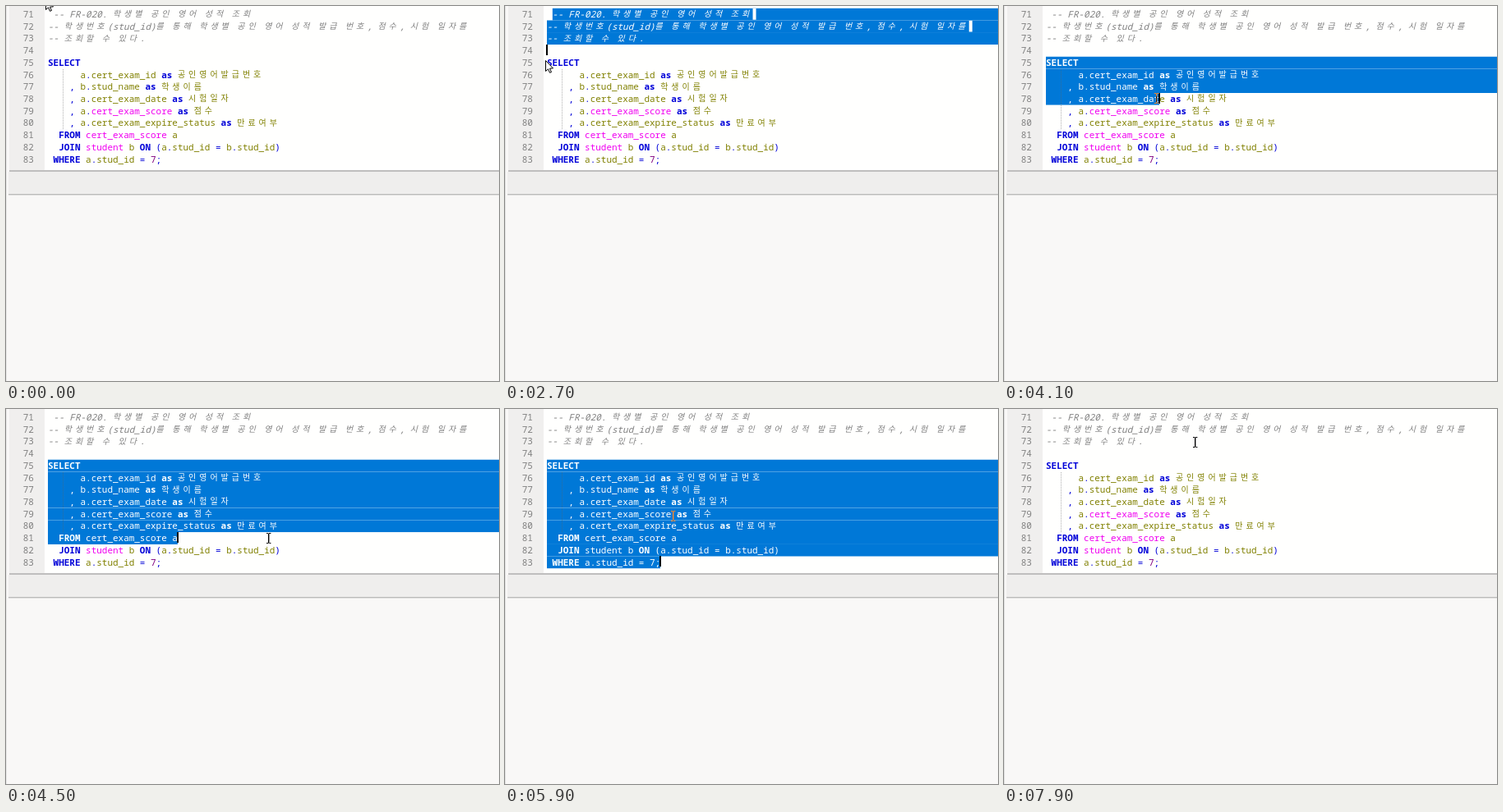
An HTML page with a canvas for the animation above (8 s loop, 600 by 457 pixels).

```html
<!DOCTYPE html>
<html lang="ko">
<head>
<meta charset="utf-8">
<title>SQL editor</title>
<style>
html, body { margin: 0; width: 100%; height: 100%; overflow: hidden; background: #f9f8f7; }
canvas { display: block; }
</style>
</head>
<body>
<canvas id="stage" width="600" height="457"></canvas>
<script>
const ctx = document.getElementById('stage').getContext('2d');
const W = 600, H = 457, LOOP = 8000, STEP = 100;
const LEFT = 51, CELL = 6.58, TOP = 2.6, PITCH = 14.73, BASE = 11.3, FIRST = 71;
const BLUE = '#0078d7';
const LATIN = '10.97px "Noto Sans Mono", "DejaVu Sans Mono", monospace';
const HANGUL = '10px "Noto Sans CJK KR", "Noto Sans CJK", "Noto Sans CJK JP", sans-serif';

const source = [
  ' -- FR-020. 학생별 공인 영어 성적 조회',
  '-- 학생번호(stud_id)를 통해 학생별 공인 영어 성적 발급 번호, 점수, 시험 일자를',
  '-- 조회할 수 있다.',
  '',
  'SELECT',
  '      a.cert_exam_id as 공인영어발급번호',
  '    , b.stud_name as 학생이름',
  '    , a.cert_exam_date as 시험일자',
  '    , a.cert_exam_score as 점수',
  '    , a.cert_exam_expire_status as 만료여부',
  '  FROM cert_exam_score a',
  '  JOIN student b ON (a.stud_id = b.stud_id)',
  ' WHERE a.stud_id = 7;'
];
const KEYWORD = /^(SELECT|FROM|JOIN|WHERE|ON|as)$/;
const TABLE = /^(cert_exam_score|student)$/;

const isWide = s => /[가-힣]/.test(s);
const rowY = row => TOP + row * PITCH;
const colX = col => LEFT + col * CELL;

function styleOf(text, comment) {
  if (comment) return ['#808080', 'italic '];
  if (KEYWORD.test(text)) return ['#0000d8', 'bold '];
  if (TABLE.test(text)) return ['#f000f0', ''];
  if (/^\d/.test(text)) return ['#800080', ''];
  if (/^[\w가-힣]/.test(text)) return ['#808000', ''];
  return ['#0000d8', ''];
}

function parse(line) {
  const comment = line.trim().startsWith('--');
  const tokens = [], stops = [0];
  let col = 0;
  for (const text of line.match(/[A-Za-z_]\w*|\d+|\s+|./g) || []) {
    const wide = isWide(text);
    const [color, face] = styleOf(text, comment);
    tokens.push({ text, col, wide, color, face });
    for (const ch of text) stops.push(col += wide ? 2 : 1);
  }
  return { tokens, stops, width: col, comment };
}
const lines = source.map(parse);

function drawLine(row, color) {
  for (const t of lines[row].tokens) {
    ctx.font = t.face + (t.wide ? HANGUL : LATIN);
    ctx.fillStyle = color || t.color;
    ctx.fillText(t.text, colX(t.col), rowY(row) + BASE - (t.wide ? 0.6 : 0));
  }
}

// Pointer path: time, x, y
const path = [
  [0, 48, -9], [700, 57, 9], [900, 57, 9], [1000, 130, 14], [1200, 351, 46],
  [1400, 300, 49], [1600, 90, 54], [1900, 49, 60], [2700, 49, 66], [3000, 52, 66],
  [3700, 52, 66], [4500, 320, 157], [4800, 330, 186], [5200, 315, 188],
  [5900, 205, 130], [6300, 208, 112], [7900, 233, 40]
];

function pointer(t) {
  let i = 1;
  while (i < path.length - 1 && path[i][0] < t) i++;
  const [t0, x0, y0] = path[i - 1], [t1, x1, y1] = path[i];
  const k = Math.min(1, Math.max(0, (t - t0) / (t1 - t0)));
  return { x: x0 + (x1 - x0) * k, y: y0 + (y1 - y0) * k };
}

function textPos({ x, y }) {
  const row = Math.max(0, Math.min(lines.length - 1, Math.floor((y - TOP) / PITCH)));
  const want = (x - LEFT) / CELL;
  const col = lines[row].stops.reduce((a, b) => Math.abs(b - want) < Math.abs(a - want) ? b : a);
  return { row, col };
}

// Mouse drags: anchor position, press time, release time, time the selection clears
const drags = [
  { row: 0, col: 1, press: 900, release: 1600, clear: 3000 },
  { row: 4, col: 0, press: 3000, release: 4800, clear: 6300 }
];

function drawSelection(start, end) {
  for (let row = start.row; row <= end.row; row++) {
    const x = colX(row === start.row ? start.col : 0);
    const right = row === end.row ? colX(end.col) : W;
    if (right <= x) continue;
    ctx.save();
    ctx.beginPath();
    ctx.rect(x, rowY(row), right - x, PITCH + 0.3);
    ctx.clip();
    ctx.fillStyle = BLUE;
    ctx.fillRect(x, rowY(row), right - x, PITCH + 0.3);
    drawLine(row, '#fff');
    if (row < 2 && right === W) {
      ctx.fillStyle = '#fffffe';
      ctx.fillRect(colX(lines[row].width) + 0.5, rowY(row) + 0.4, 4, PITCH - 1);
    }
    ctx.restore();
  }
}

function drawCaret(pos) {
  ctx.fillStyle = '#000';
  ctx.fillRect(Math.round(colX(pos.col)) - 1, Math.round(rowY(pos.row)), 2, 13);
}

function drawArrow(x, y) {
  const pts = [0, 0, 0, 13, 3, 10.3, 5, 14.8, 7, 14, 5, 9.6, 9, 9.4];
  ctx.beginPath();
  for (let i = 0; i < pts.length; i += 2) ctx.lineTo(x + pts[i] + 0.5, y + pts[i + 1] + 0.5);
  ctx.closePath();
  ctx.fillStyle = '#fff';
  ctx.fill();
  ctx.strokeStyle = '#000';
  ctx.lineWidth = 1;
  ctx.stroke();
}

function drawBeam(x, y) {
  x = Math.round(x);
  y = Math.round(y);
  ctx.globalCompositeOperation = 'difference';
  ctx.fillStyle = '#fff';
  ctx.fillRect(x - 1, y - 5, 1.4, 12);
  for (const edge of [y - 6, y + 6]) {
    ctx.fillRect(x - 3, edge, 2.4, 1);
    ctx.fillRect(x, edge, 2.4, 1);
  }
  ctx.globalCompositeOperation = 'source-over';
}

function box(color, x, y, w, h) {
  ctx.fillStyle = color;
  ctx.fillRect(x, y, w, h);
}

function drawPanels() {
  box('#f9f8f7', 0, 0, W, H);
  box('#fffffe', 4, 0, W - 4, 200);
  box('#f0efee', 4, 0, 43, 200);
  box('#efeeed', 3, 202, W - 3, 27);
  box('#858585', 4, 200.5, W - 4, 1);
  box('#a2a2a2', 3, 229.3, W - 3, 1);
  box('#e3e3e2', 0, 0, 1, H);
  ctx.font = LATIN;
  ctx.fillStyle = '#808080';
  lines.forEach((_, row) => ctx.fillText(FIRST + row, 20.7, rowY(row) + BASE));
}

function drawGuide() {
  for (let y = 77; y < 150; y += 2) box('rgba(100,100,100,.5)', 69, y, 1, 1);
}

function render(t) {
  const mouse = pointer(t);
  drawPanels();
  lines.forEach((_, row) => drawLine(row));
  const drag = drags.find(d => t >= d.press && t < d.clear);
  let caret = null;
  if (drag) {
    caret = textPos(pointer(Math.min(t, drag.release)));
    drawSelection(drag, caret);
  }
  drawGuide();
  if (drag) {
    const idle = t - drag.release;
    if (idle < 0 || idle % 1060 < 530) drawCaret(caret);
  }
  if (mouse.x < 50) drawArrow(mouse.x, mouse.y);
  else drawBeam(mouse.x, mouse.y);
}

const began = performance.now();
function tick() {
  const t = (performance.now() - began) % LOOP;
  render(Math.floor(t / STEP) * STEP);
  requestAnimationFrame(tick);
}
tick();
</script>
</body>
</html>
```
